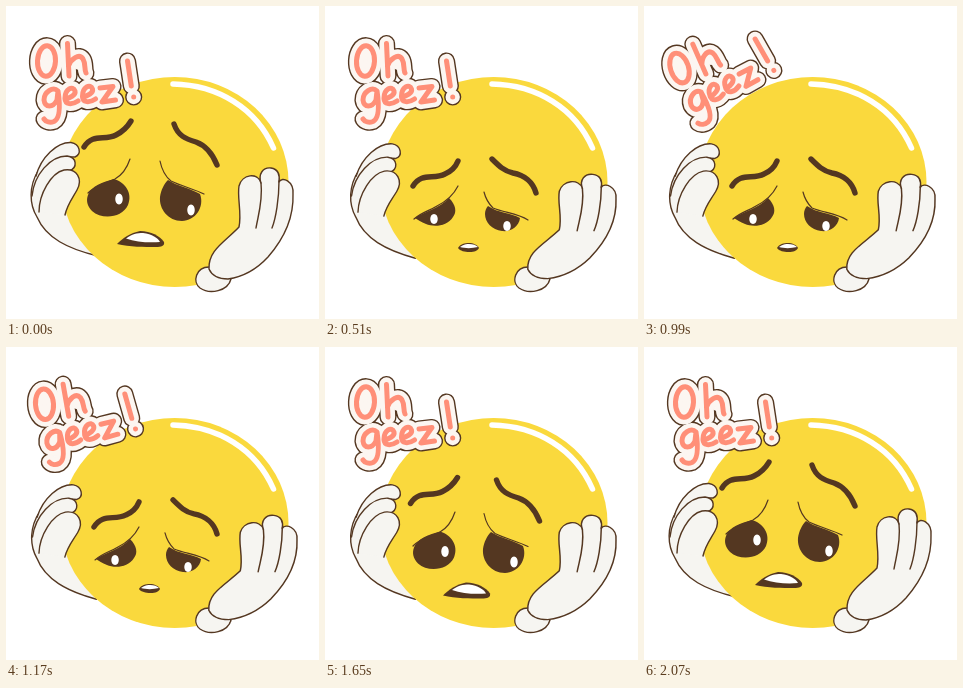
An HTML page that plays this animation: 313x313 px, repeating every 2.1 s.

```html
<!DOCTYPE html>
<html lang="en">
<head>
<meta charset="utf-8">
<title>Oh geez!</title>
<style>
  html, body { margin: 0; width: 100%; height: 100%; overflow: hidden; background: #fff; }
  svg { display: block; width: 100%; height: 100%; }
  .ink { fill: #543721; }
  .line { fill: none; stroke: #543721; stroke-linecap: round; stroke-linejoin: round; }
  .brow { stroke-width: 5.4; }
  .lid { stroke-width: 1.2; }
  .white { fill: #fff; }
  .glove { fill: #f6f5f1; stroke: #543721; stroke-width: 1.4; stroke-linecap: round; stroke-linejoin: round; }
  .letters { fill: none; stroke-linecap: round; stroke-linejoin: round; }
</style>
</head>
<body>
<svg viewBox="0 0 313 313" role="img" aria-label="Oh geez!">
  <defs>
    <g id="lettering">
      <ellipse cx="40.5" cy="55" rx="9" ry="15.3" transform="rotate(3 40.5 55)"/>
      <path d="M61.5 37.5L63 70M62.5 60C65 53 73 47 77 53C80 58 78 63 80 67"/>
      <path d="M52 85C47 80 38 86 38 94C39 102 47 102 51 94L52 85C54 98 55 112 48 115.5C44 117 40 116 38 113"/>
      <path id="e" d="M59 93C64 92 70 89 69 85C67 79 59 83 59 92C59 99 66 99 72 95"/>
      <use href="#e" x="17.5" y="-2"/>
      <path d="M94 82L107 80.5L96 96L109.5 94M121.5 55L125.3 80M127.7 91v.01"/>
    </g>
  </defs>

  <g class="leftHand">
    <path class="glove" d="M32 165C23 180 23 198 31 211C40 232 62 243 92 250L82 200L60 160Z"/>
  </g>

  <ellipse cx="168.7" cy="176" rx="113.8" ry="105" fill="#fad93d"/>
  <path d="M167 78C212 79 250 102 267.5 142" fill="none" stroke="#fff" stroke-width="5.5" stroke-linecap="round"/>
  <g id="features"></g>

  <g class="leftHand">
    <path class="glove" d="M30 170C35 151 51 136 65 136.5C74 138 76 148 69 151C56 150 44 156 38 170"/>
    <path class="glove" d="M26 190C28 169 44 150 61 150C71 151 72 162 63 165C51 168 47 180 40 195"/>
    <path class="glove" d="M33 206C33 188 45 167 58 164C71 162 77 173 71 184C66 193 61 199 59 209"/>
  </g>

  <path class="glove" d="M203 261C190 261 186 276 194 282C204 289 222 285 225 273Z"/>
  <g id="rightHand">
    <path class="glove" d="M203 263C202 244 219 236 233 221C236 207 231 192 233 180C236 168 252 166 255 177C252 168 257 161 265 162C272 163 274 169 273 176C276 170 288 175 287 188C288 215 276 235 262 251C250 264 236 271 222 273C213 273 206 270 203 263Z"/>
    <path class="line" stroke-width="1.4" d="M255 177C257 195 252 210 250 222M273 175C273 192 270 212 266 222"/>
  </g>

  <g id="sticker" class="letters">
    <use href="#lettering" stroke="#543721" stroke-width="17.2"/>
    <g fill="#fcf6f1">
      <use href="#lettering" stroke="#fcf6f1" stroke-width="14.4"/>
    </g>
    <use href="#lettering" stroke="#ff8f78" stroke-width="5"/>
  </g>
</svg>
<script>
const LOOP = 2100;
const byId = id => document.getElementById(id);

// class, worried pose, drooped pose, shift of the worried pose when it sits low
const parts = [
  ["line brow",
    "M78 141C87 127 98 135 110 129C118 125 122 120 125 115",
    "M88 180C97 166 108 174 120 168C127 165 131 160 133 155", 7.5, 15.5],
  ["line brow",
    "M168 118C172 130 180 133 190 136C201 140 207 149 211 159",
    "M167 153C174 160 179 165 188 167C199 169 208 176 211 187", 3.5, 15],
  ["line lid",
    "M124 153C121 162 116 169 109 173C99 177 88 180 82 187",
    "M133 180C128 190 120 196 112 200C104 205 97 206 89 213", 6, 12],
  ["line lid",
    "M154 155C156 165 160 171 165 175C175 180 188 183 198 188",
    "M159 186C161 194 165 199 168 202C180 207 192 207 203 214", 5, 11.5],
  ["ink",
    "M82 189C85 180 97 176 108 173C119 176 127 187 122 199C116 212 96 214 86 205C81 200 80 194 82 189Z",
    "M90 212C100 205 114 203 124 192C131 199 132 206 128 211C122 221 108 221 101 218C96 216 93 214 90 212Z", 7, 11.5],
  ["ink",
    "M162 174C171 180 184 182 194 188C199 201 189 215 176 215C162 215 153 203 154 191C155 184 158 178 162 174Z",
    "M163 200C173 207 186 207 195 212C194 221 185 226 177 225C167 224 160 216 160 208C160 205 161 202 163 200Z", 4, 11],
  ["white",
    "M113 187.5C118 187.5 118 198.5 113 198.5C108 198.5 108 187.5 113 187.5Z",
    "M109 208C114 208 114 218 109 218C104 218 104 208 109 208Z", 7, 11.5],
  ["white",
    "M185 198.5C190 198.5 190 209.5 185 209.5C180 209.5 180 198.5 185 198.5Z",
    "M182 215C187 215 187 225 182 225C177 225 177 215 182 215Z", 4, 11],
  ["ink",
    "M111 238C117 232 124 227 134 225C145 225 154 230 158 236C159 240 155 241 150 241C138 241 124 241 111 238Z",
    "M133 242C135 238 140 237 144 237C148 237 153 239 154 242C152 246 147 246 144 246C140 246 135 245 133 242Z", 7, 10.5],
  ["white",
    "M120 232.5C126 228 131 227 137 227C146 228 152 232 154 236C143 237 130 236 120 232.5Z",
    "M135 241C138 238.5 142 238 144 238C148 238 151 239 153 241C147 242.5 140 242.5 135 241Z", 7, 10.5]
].map(([cls, worried, drooped, dx, dy]) => {
  const node = document.createElementNS("http://www.w3.org/2000/svg", "path");
  node.setAttribute("class", cls);
  byId("features").append(node);
  return { node, worried, drooped: drooped.match(/[\d.]+/g), shift: [dx, dy] };
});

const clamp = x => Math.min(1, Math.max(0, x));
const ease = p => p < 0.5 ? 4 * p ** 3 : 1 - (2 - 2 * p) ** 3 / 2;
const between = (t, from, to) => ease(clamp((t - from) / (to - from)));
const wave = turns => (1 - Math.cos(2 * Math.PI * turns)) / 2;
const around = (node, x, y, change) =>
  node.setAttribute("transform", `translate(${x} ${y}) ${change} translate(${-x} ${-y})`);

function drawFace(droop, low) {
  for (const { node, worried, drooped, shift } of parts) {
    let i = 0;
    node.setAttribute("d", worried.replace(/[\d.]+/g, n => {
      const value = +n + droop * (drooped[i] - n) + low * shift[i % 2];
      i++;
      return value.toFixed(2);
    }));
  }
}

function render(time) {
  const t = Math.floor(time % LOOP / 30) * 30;
  const opening = between(t, 1140, 1440);
  drawFace(between(t, 120, 510) - opening, opening - between(t, 1650, 2100));

  // the hands press and release in a quick tremble
  const press = t > 120 && t < 2040 ? wave((t - 120) / 120) : 0;
  around(byId("rightHand"), 207, 268, `scale(${1 + 0.1 * press} ${1 - 0.12 * press})`);
  for (const hand of document.querySelectorAll(".leftHand"))
    around(hand, 28, 205, `rotate(${4 * press})`);

  around(byId("sticker"), 57, 72, `rotate(${-21 * wave(clamp((t - 690) / 600))})`);
}

const start = performance.now();
function tick() {
  render(performance.now() - start);
  requestAnimationFrame(tick);
}
tick();
</script>
</body>
</html>
```
